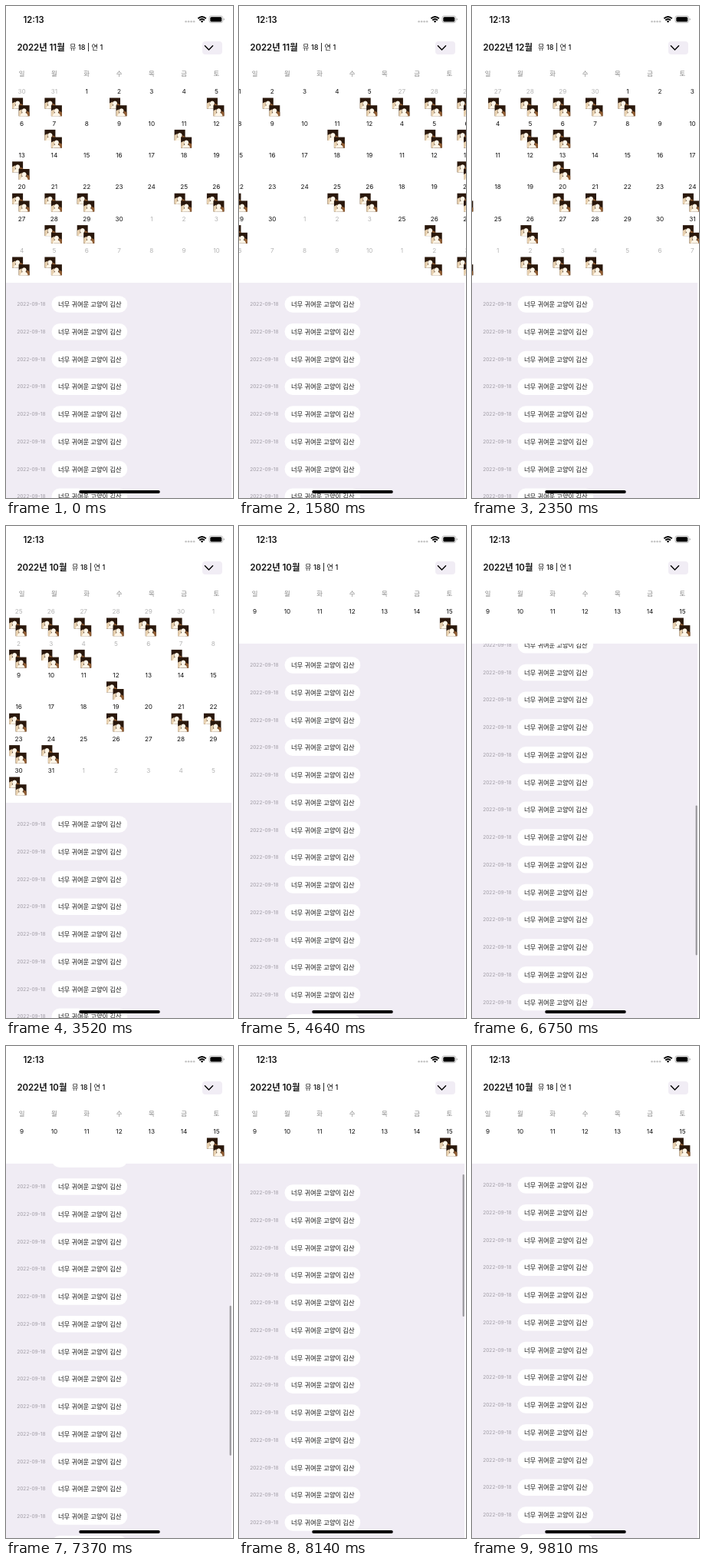
Recreate the animation shown at these times as an HTML page. Size 296 px wide and 640 px high, loop 9860 ms.

```html
<!DOCTYPE html>
<html lang="ko">
<head>
<meta charset="utf-8">
<title>달력</title>
<style>
  html, body { margin: 0; width: 100%; height: 100%; overflow: hidden; background: #fff; }
  svg { display: block; width: 296px; height: 640px; }
  text { font-family: Inter, "Noto Sans CJK KR", "Noto Sans CJK", sans-serif; fill: #111; }
  .clock { font-size: 11.2px; font-weight: 600; }
  .month { font-size: 11.4px; font-weight: 600; }
  .count { font-size: 9.2px; font-weight: 500; }
  .week { font-size: 8.4px; fill: #858585; text-anchor: middle; }
  .day { font-size: 8.2px; text-anchor: middle; }
  .out { fill: #b4b4b4; }
  .date { font-size: 6.6px; fill: #a19da6; }
  .note { font-size: 8.25px; font-weight: 500; }
</style>
</head>
<body>
<svg viewBox="0 0 296 640">
  <defs>
    <g id="photo">
      <rect width="14" height="14" fill="#2a180c"/>
      <path d="M0 7 L4 5 V14 H0Z" fill="#e6cfae"/>
      <path d="M10 7 L14 9 V14 H10Z" fill="#8f5c32"/>
      <path d="M2 14 Q2.5 10.5 5 9.8 Q3.8 8.5 4 6.5 Q4.6 4 7 4 Q9.6 4 10 6.5 Q10 8.6 8.8 9.8 Q11.4 10.5 12 14Z" fill="#fff6e8"/>
    </g>
    <g id="pair"><use href="#photo" x="-12.5" y="8.3"/><use href="#photo" x="-4" y="18"/></g>
  </defs>
  <rect y="153" width="294" height="487" fill="#f0ecf4"/>
  <g id="list"></g>
  <rect id="cover" width="296" height="360" fill="#fff"/>
  <g id="pages"></g>
  <g id="weekdays"></g>

  <text class="clock" x="22.6" y="21.6">12:13</text>
  <g id="dots" fill="#c4c4c4"></g>
  <g fill="none" stroke="#000" stroke-width="1.9">
    <path d="M250.4 16.2 Q255.6 11.6 260.8 16.2"/>
    <path d="M252.3 18.5 Q255.6 15.6 258.9 18.5"/>
  </g>
  <path d="M253.8 19.8 Q255.6 18.4 257.4 19.8 L255.6 21.8Z"/>
  <rect x="265" y="12.9" width="17.6" height="8.8" rx="2.5" fill="none" stroke="#aaa" stroke-width=".8"/>
  <rect x="266.3" y="14.2" width="15" height="6.2" rx="1.5"/>
  <path d="M283.6 15.8 q1.2 .4 1.2 1.5 t-1.2 1.5Z" fill="#aaa"/>

  <text id="month" class="month" x="14.4" y="58"></text>
  <text id="count" class="count" y="57">뮤 18 | 연 1</text>
  <rect x="256" y="46" width="26" height="17" rx="4" fill="#f1edf5"/>
  <path d="M259.4 51.8 L264.5 57 L269.6 51.8" fill="none" stroke="#000" stroke-width="1.4" stroke-linecap="round" stroke-linejoin="round"/>

  <rect id="bar" x="291.6" width="2.2" rx="1.1" fill="#000" fill-opacity=".36"/>
  <rect x="95.2" y="630.1" width="105.6" height="4" rx="2"/>
</svg>
<script>
const LOOP = 9860, WIDTH = 296, STEP = 110, PITCH = 35.75, ITEMS = 32;
const FLIP = 2350, FOLD = 4640;
const $ = id => document.getElementById(id);

function add(parent, tag, attrs, text = '') {
  const el = document.createElementNS('http://www.w3.org/2000/svg', tag);
  for (const k in attrs) el.setAttribute(k, attrs[k]);
  el.textContent = text;
  parent.append(el);
  return el;
}

const colX = c => 20.6 + 42.3 * c;
const rowY = r => 111.2 + 41.4 * r;

// photos: one word per week, naming the columns that carry photos
function makePage(day, first, last, photos) {
  const g = add($('pages'), 'g', {});
  photos.split(' ').forEach((cols, r) => {
    for (let c = 0; c < 7; c++) {
      const i = r * 7 + c, x = colX(c), y = rowY(r);
      const out = i < first || i > last;
      add(g, 'text', { class: out ? 'day out' : 'day', x, y: y + 3 }, day(i));
      if (cols.includes(c)) add(g, 'use', { href: '#pair', x, y });
    }
  });
  return g;
}

// lead: days shown from the previous month, whose length is prev
const monthDays = (lead, prev, len) => i =>
  i < lead ? prev - lead + 1 + i : (i - lead) % len + 1;

const nov = monthDays(2, 31, 30);
const novFirst = makePage(nov, 2, 31, '0136 15 0 01256 12 01');
const novAgain = makePage(nov, 2, 31, '013 15 0 01256 12 016');
const dec = makePage(monthDays(4, 30, 31), 4, 34, '01234 12 2 236 16 123');
const oct = makePage(monthDays(6, 30, 31), 14, 36, '012345 0125 3 0356 01 0');
const week = makePage(i => 9 + i, 0, 6, '6');

[...'일월화수목금토'].forEach((d, c) =>
  add($('weekdays'), 'text', { class: 'week', x: colX(c), y: 91.2 }, d));

for (let i = 0; i < 4; i++)
  add($('dots'), 'circle', { cx: 234.6 + 3.5 * i, cy: 20.2, r: 1.3 });

for (let i = 0; i < ITEMS; i++) {
  const y = 28 + i * PITCH;
  add($('list'), 'text', { class: 'date', x: 14.2, y: y + 2.2 }, '2022-09-18');
  add($('list'), 'rect', { x: 59.6, y: y - 10.8, width: 98.6, height: 21.6, rx: 10.5, fill: '#fff' });
  add($('list'), 'text', { class: 'note', x: 68, y: y + 3 }, '너무 귀여운 고양이 김산');
}

// Moves: start in ms, number of steps, end value
const swipe = [ // months away from November
  [1470, 5, 1], [FLIP, 1, 1 - 13 / WIDTH], [2460, 3, 0],
  [3150, 1, -.05], [3300, 3, 4 / WIDTH - 1], [4410, 1, -1]
];
const scroll = [ // list offset in px
  [5770, 2, 8], [6030, 1, 147], [6140, 4, 450], [6750, 1, 491],
  [6920, 5, 427], [7480, 7, -10], [8260, 3, -1], [9550, 1, 0]
];

const smooth = p => p * p * (3 - 2 * p);

function at(moves, t) {
  let v = 0;
  for (const [start, steps, end] of moves) {
    if (t < start) break;
    const done = Math.floor((t - start) / STEP) + 1;
    v += (end - v) * smooth(Math.min(1, done / steps));
  }
  return v;
}

function place(page, x, shown) {
  page.setAttribute('transform', `translate(${x.toFixed(2)} 0)`);
  page.style.display = shown && Math.abs(x) < WIDTH ? '' : 'none';
}

function draw(t) {
  const pos = at(swipe, t), y = at(scroll, t), folded = t >= FOLD;
  place(oct, (-1 - pos) * WIDTH, !folded);
  place(novFirst, -pos * WIDTH, t < FLIP);
  place(novAgain, -pos * WIDTH, t >= FLIP && !folded);
  place(dec, (1 - pos) * WIDTH, !folded);
  place(week, 0, folded);

  $('month').textContent = `2022년 ${11 + Math.round(pos)}월`;
  $('count').setAttribute('x', 83 + 3 * Math.abs(Math.round(pos)));

  const top = folded ? 153 : 360;
  $('cover').setAttribute('height', top);
  $('list').setAttribute('transform', `translate(0 ${top - y})`);
  $('bar').setAttribute('y', 167 + .4 * Math.max(0, y));
  $('bar').setAttribute('height', 195 + Math.min(0, y));
  $('bar').setAttribute('opacity', t < scroll[0][0] || t >= 9810 ? 0 : t < 9700 ? 1 : .5);
}

const begin = performance.now();
function tick() {
  draw((performance.now() - begin) % LOOP);
  requestAnimationFrame(tick);
}
tick();
</script>
</body>
</html>
```
